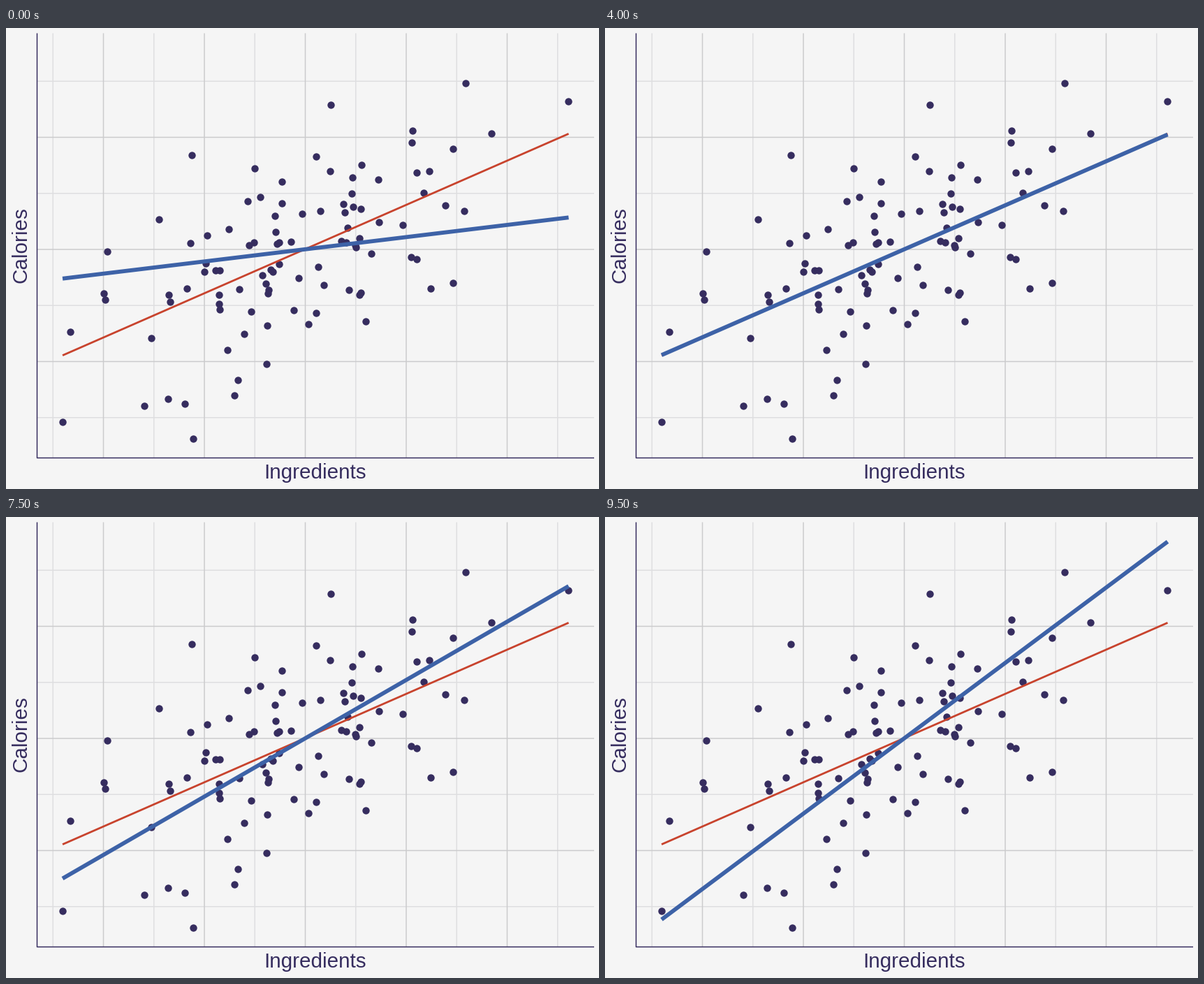
Animation, 849 px wide and 660 px high, one loop 10000 ms. Source, as a matplotlib script:

```python
import numpy as np
import matplotlib.pyplot as plt
from matplotlib.animation import FuncAnimation

W, H, DPI = 849, 660, 64
PX = 72 / DPI  # points per pixel

PAPER, INK = "#f5f5f5", "#362d5f"
MAJOR, MINOR = "#cbcbcd", "#dedee0"
RED, BLUE = "#c8432d", "#3d62a7"

LEFT, RIGHT, TOP, BOTTOM = 44.5, 842, 7.5, 615.5
X_MID, Y_MID = 428.5, 316.8   # the moving line turns about this point
STEP_X, STEP_Y = 144.5, 160.5
ENDS = np.array([81, 805.5])

# Scatter data in stage pixels, from left to right
xs = [
    81, 92, 140, 142.5, 145, 198.5, 208.5, 219, 232.5, 233,
    235, 256, 259, 264.5, 266.5, 268, 284.5, 286.5, 288, 300,
    306.5, 305.5, 305.5, 306.5, 317, 319.5, 327, 332, 334.5, 341.5,
    346, 348, 355, 351, 356.5, 364.5, 367.5, 372.5, 376.5, 375.5,
    374, 373.5, 379.5, 382.5, 385.5, 386.5, 388, 391, 391.5, 395,
    395.5, 408, 412, 419.5, 424.5, 433, 444, 444.5, 447, 450,
    455.5, 464, 465.5, 480.5, 487.5, 483.5, 485.5, 489, 491.5, 495.5,
    496, 497, 500, 501, 506, 506, 508.5, 509, 508.5, 515.5,
    523.5, 533, 534.5, 568.5, 580.5, 588.5, 581, 582.5, 588.5, 598.5,
    606, 608, 629, 640, 640, 656, 658.5, 695.5, 805.5,
]
ys = [
    563.5, 435, 380, 388.5, 319.5, 540.5, 443.5, 273.5, 531, 382,
    391.5, 538, 372.5, 308, 182, 588, 349, 336.5, 297, 346.5,
    347, 382, 394.5, 402.5, 461, 287.5, 526, 503.5, 374, 438,
    247.5, 311, 307, 406, 200.5, 241.5, 354, 366, 375, 380,
    426, 480.5, 346, 349, 268.5, 292, 309, 307, 338, 219.5,
    250.5, 305.5, 404, 358, 265.5, 424, 183.5, 408, 341.5, 262,
    367.5, 205, 110, 304.5, 306.5, 251.5, 264, 286, 375, 236.5,
    213.5, 255.5, 310.5, 314, 301, 381.5, 379, 196, 258.5, 420,
    322.5, 217, 277.5, 282, 327.5, 331, 164, 147, 207, 236,
    204.5, 373, 254, 173, 365, 261.5, 78.5, 151, 104.5,
]

# Height of the moving line's right end at each half-second step
right_y = [
    271.3, 234, 228, 214.3, 162, 159, 159, 156, 152.5, 149,
    147, 139, 124, 102, 102, 99, 68.7, 60, 47, 35.3,
]

plt.rcParams["path.snap"] = False
fig = plt.figure(figsize=(W / DPI, H / DPI), dpi=DPI, facecolor=PAPER)
ax = fig.add_axes([0, 0, 1, 1])
ax.set(xlim=(0, W), ylim=(H, 0))
ax.axis("off")


def stroke(x, y, color, width, z):
    return ax.plot(x, y, color=color, lw=width * PX, zorder=z,
                   solid_capstyle="butt")[0]


def grid(offsets, color, z):
    for k in offsets:
        x, y = X_MID + k * STEP_X, 317 + k * STEP_Y
        stroke([x, x], [TOP, BOTTOM], color, 1.5, z)
        if TOP < y < BOTTOM:
            stroke([LEFT, RIGHT], [y, y], color, 1.5, z)


def line_heights(end_y):
    slope = (end_y - Y_MID) / (ENDS[1] - X_MID)
    return Y_MID + slope * (ENDS - X_MID)


grid(np.arange(-2.5, 3), MINOR, 1)
grid(np.arange(-2, 3), MAJOR, 2)
stroke([LEFT, LEFT, RIGHT], [TOP, BOTTOM, BOTTOM], INK, 1.5, 3)
ax.scatter(xs, ys, s=(10.4 * PX) ** 2, color=INK, linewidths=0, zorder=4)
stroke(ENDS, [468.7, 151.4], RED, 2.8, 5)
fit = stroke(ENDS, line_heights(right_y[0]), BLUE, 5.8, 6)

label = dict(family="Liberation Sans", size=29.6 * PX, color=INK)
ax.text(442.5, 645, "Ingredients", ha="center", va="baseline", **label)
ax.text(29.5, 311, "Calories", rotation=90, rotation_mode="anchor",
        ha="center", va="baseline", **label)


def draw(i):
    fit.set_ydata(line_heights(right_y[i]))
    return [fit]


anim = FuncAnimation(fig, draw, frames=len(right_y), interval=500,
                     repeat=True, repeat_delay=0)
plt.show()
```
